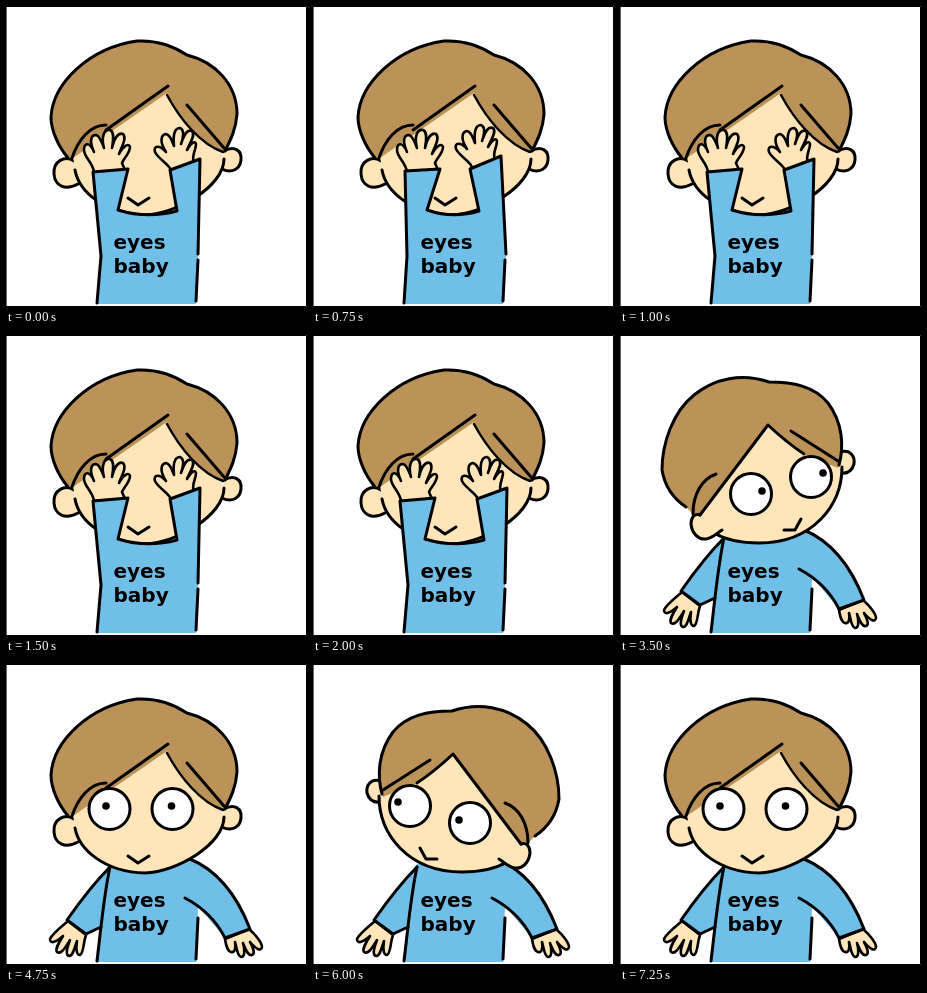
Animation, 301 px wide and 301 px high, one loop 8 s. Source, as an HTML page with a canvas:

```html
<!DOCTYPE html>
<html lang="en">
<head>
<meta charset="utf-8">
<title>Eyes baby</title>
<style>
html, body { margin: 0; width: 100%; height: 100%; overflow: hidden; background: #fff; }
canvas { display: block; width: 301px; height: 301px; }
</style>
</head>
<body>
<canvas id="stage"></canvas>
<script>
const SIZE = 301, LOOP = 8000;
const SKIN = '#ffe6ba', HAIR = '#bb9359', SHIRT = '#70bfe9';
const canvas = document.getElementById('stage');
const ctx = canvas.getContext('2d');
const dpr = window.devicePixelRatio || 1;
canvas.width = canvas.height = Math.round(SIZE * dpr);

function shape(d, fill, width = 3) {
  const p = new Path2D(d);
  if (fill) {
    ctx.fillStyle = fill;
    ctx.fill(p);
  }
  if (width) {
    ctx.lineWidth = width;
    ctx.stroke(p);
  }
}

const line = (d, width) => shape(d, null, width);

function disc(x, y, r, fill, width) {
  ctx.beginPath();
  ctx.arc(x, y, r, 0, Math.PI * 2);
  ctx.fillStyle = fill;
  ctx.fill();
  if (width) {
    ctx.lineWidth = width;
    ctx.stroke();
  }
}

function eye(x, y, px, py) {
  disc(x, y, 20.5, '#fff', 3);
  disc(px, py, 3.8, '#000');
}

function mirrored(axisSum, draw) {
  ctx.save();
  ctx.translate(axisSum, 0);
  ctx.scale(-1, 1);
  draw();
  ctx.restore();
}

function shifted(x, y, draw) {
  ctx.save();
  ctx.translate(x, y);
  draw();
  ctx.restore();
}

function frontHead(open) {
  const jaw = 'M69 164C73 186 99 208 139 209C171 208 218 180 218 153';
  const crown = 'M62 152C52 140 45 124 45 111C47 77 83 42 131 35C151 34 166 39 181 49C209 56 231 78 231 108C230 123 225 133 219 145';
  shape('M68 155C59 149 47 155 48 168C49 180 59 185 72 178', SKIN);
  shape('M218 145C229 139 236 145 235 154C234 163 226 168 216 163', SKIN);
  shape(jaw + 'L200 110L160 84L90 112L67 150Z', SKIN, 0);
  line(jaw);
  shape(crown + 'C201 142 181 122 161 87L67 152Z', HAIR, 0);
  line(crown);
  line('M66 152C72 134 84 119 100 119');
  line('M100 124L162 80');
  line('M161 89C174 113 194 138 217 146', 2.5);
  line('M181 99L218 142');
  if (open) {
    eye(103.5, 145, 100, 142);
    eye(166.500, 145, 165.5, 142);
  }
  line('M122 192L132 199L143 192');
}

function sideHead() {
  const jaw = 'M66 132C66 170 95 208 149 208C166 208 182 205 194 198';
  const crown = 'M69 130C64 112 65 88 80 68C94 51 115 47 139 47C166 38 193 43 214 60C235 77 246 108 246 135C243 153 234 164 222 172';
  shape('M68 117C57 114 53 122 54 129C56 136 61 139 68 138', SKIN);
  shape(jaw + 'L208 180L141 88L68 128Z', SKIN, 0);
  line(jaw);
  shape(crown + 'L215 179L208 180L140 90Q122 107 102 120L70 133Z', HAIR, 0);
  shape('M208 180C214 178 217 183 217 189C216 199 209 205 202 204C195 203 191 198 186 195', SKIN);
  line(crown);
  line('M70 126L117 96');
  line('M104 119Q122 107 140 90L208 180');
  line('M192 139C206 144 215 159 215 179');
  eye(97, 142, 85, 138);
  eye(157, 159, 146, 156);
  line('M107 184L113 195L124 195');
}

function leftHand() {
  shape('M62 257C55 263 46 270 44 275C44 280 49 279 57 272C52 280 49 285 51 288C55 291 59 284 64 276C61 284 59 291 63 292C67 292 68 285 71 277C70 284 70 291 74 291C78 289 77 279 80 271Z', SKIN, 2.6);
}

function rightHand() {
  shape('M243 265C250 271 256 279 256 283C255 288 250 285 244 278C248 285 249 290 246 291C242 292 240 286 237 279C239 286 239 293 235 293C231 292 231 284 229 278C230 284 229 289 225 288C221 287 220 281 219 275Z', SKIN, 2.6);
}

function restingBody() {
  leftHand();
  rightHand();
  shape('M104 200L61 256L80 270L96 263L91 298H190L192 242L219 274L244 265C232 234 213 207 184 194Z', SHIRT, 0);
  line('M104 203C88 219 75 236 61 256L80 270L95 263');
  line('M104 203C98 230 95 264 91 297');
  line('M184 195C213 207 232 234 244 265L219 274C210 256 196 243 179 234');
  line('M192 254L190 295');
}

function raisedLeft() {
  shape('M88 166C87 157 78 151 78 144C78 136 84 136 88 146C83 135 85 129 90 129C94 130 96 137 98 142C95 131 98 123 104 124C109 126 107 136 106 142C108 133 112 126 117 128C121 132 116 140 113 148C118 139 123 137 124 141C124 147 118 152 116 157L119 164Z', SKIN, 2.6);
}

function raisedRight() {
  shape('M165 165C165 159 153 154 149 146C147 139 154 139 160 146C154 137 154 129 160 128C165 129 166 136 168 140C167 130 168 122 174 122C179 124 177 133 175 138C178 129 181 123 186 125C190 129 184 136 181 144C185 137 189 134 190 138C190 145 185 149 188 157Z', SKIN, 2.6);
}

function raisedArms(inward) {
  shifted(inward ? 6 : 0, 0, raisedLeft);
  shifted(inward ? -6 : 0, inward ? -3 : 0, raisedRight);
  const edge = inward
    ? 'M91 297L94 250L92 165L127 163L114 204Q140 213 166 205L157 163L188 150L193 248'
    : 'M91 297L95 250L87 166L122 163L112 204Q141 213 171 205L164 164L194 153L192 248';
  shape(edge + 'L190 298H91Z', SHIRT, 0);
  line(edge);
  line('M192 254L190 295');
}

function label() {
  ctx.fillStyle = '#000';
  ctx.font = 'bold 20px "DejaVu Sans", Verdana, sans-serif';
  ctx.fillText('eyes', 107.5, 243);
  ctx.fillText('baby', 107.5, 266.5);
}

function draw(t) {
  ctx.setTransform(dpr, 0, 0, dpr, 0, 0);
  ctx.fillStyle = '#fff';
  ctx.fillRect(0, 0, SIZE, SIZE);
  ctx.strokeStyle = '#000';
  ctx.lineCap = ctx.lineJoin = 'round';

  if (t < 2250) {
    frontHead(false);
    raisedArms(Math.floor(t / 250) % 2 === 1);
  } else {
    restingBody();
    if (t >= 3500 && t < 4750) mirrored(288, sideHead);
    else if (t >= 6000 && t < 7250) sideHead();
    else frontHead(true);
  }
  label();

  ctx.lineWidth = 1;
  ctx.strokeRect(0.5, 0.5, SIZE - 1, SIZE - 1);
}

const start = performance.now();
function tick() {
  draw((performance.now() - start) % LOOP);
  requestAnimationFrame(tick);
}
tick();
</script>
</body>
</html>
```
